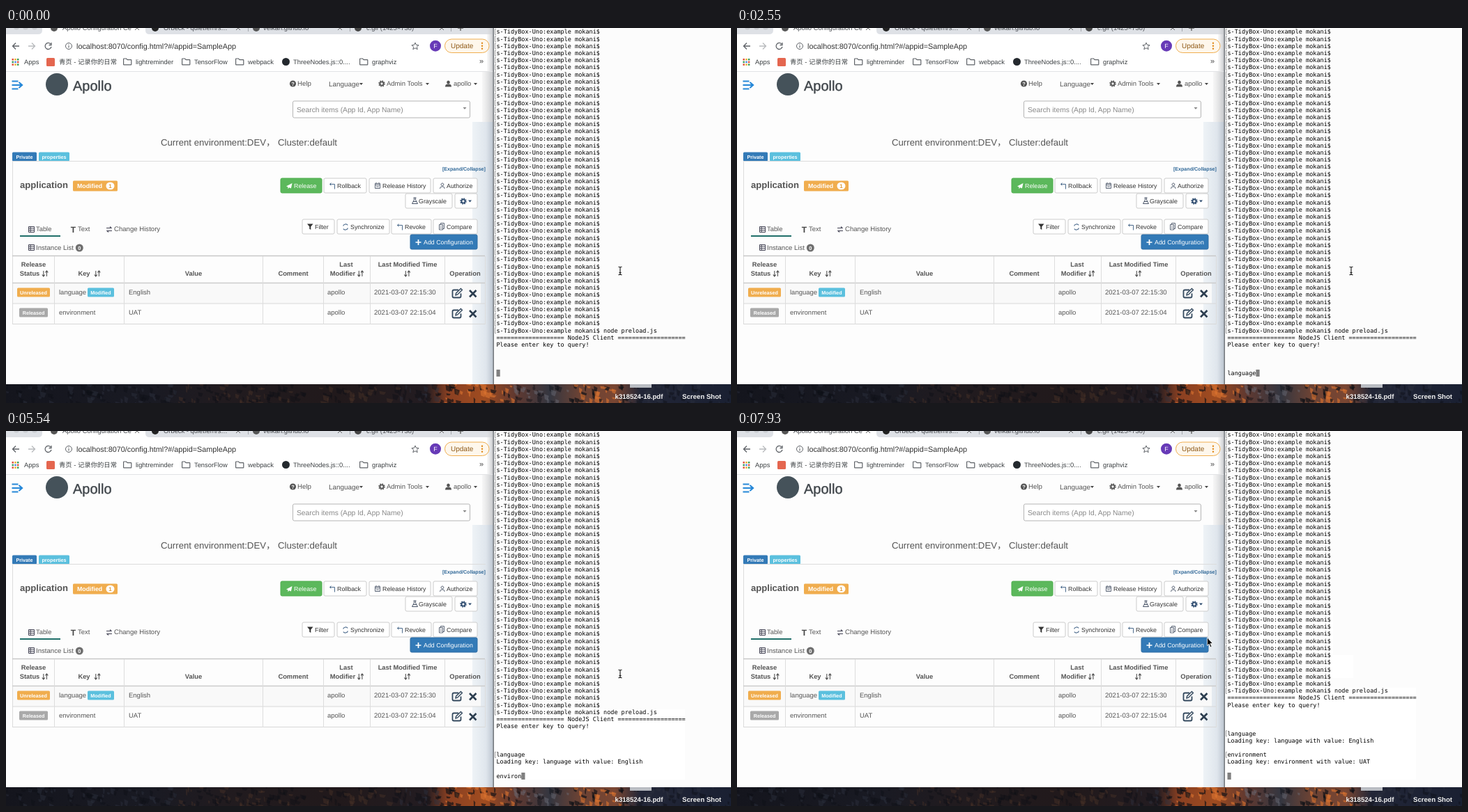
Write an HTML page that moves like this. It is 1040x539 px and loops after 8 s.

```html
<!DOCTYPE html>
<html lang="en">
<head>
<meta charset="utf-8">
<title>Configuration client demo</title>
<style>
  html, body { margin: 0; width: 100%; height: 100%; overflow: hidden; background: #fdfdfd; }
  svg { display: block; width: 1040px; height: 539px; }
  text { font-family: "Liberation Sans", "Noto Sans CJK SC", "Noto Sans CJK", sans-serif; white-space: pre; text-rendering: geometricPrecision; }
  text.mono { font-family: "DejaVu Sans Mono", monospace; font-size: 8.5px; }
</style>
</head>
<body>
<svg id="stage" viewBox="0 0 1040 539" xmlns="http://www.w3.org/2000/svg">
  <defs>
    <linearGradient id="wall">
      <stop offset="0" stop-color="#14151d"/><stop offset=".2" stop-color="#191a23"/>
      <stop offset=".3" stop-color="#211b1f"/><stop offset=".46" stop-color="#21191b"/>
      <stop offset=".58" stop-color="#231c21"/><stop offset=".61" stop-color="#8a4022"/>
      <stop offset=".66" stop-color="#a04c20"/><stop offset=".7" stop-color="#63392f"/>
      <stop offset=".75" stop-color="#343640"/><stop offset=".79" stop-color="#6a4234"/>
      <stop offset=".84" stop-color="#7a4632"/><stop offset=".875" stop-color="#222637"/>
      <stop offset="1" stop-color="#1a2032"/>
    </linearGradient>
    <linearGradient id="shade">
      <stop offset="0" stop-color="#dfe8ef" stop-opacity=".5"/>
      <stop offset=".65" stop-color="#d5dee7" stop-opacity=".75"/>
      <stop offset="1" stop-color="#b9c2cd"/>
    </linearGradient>
    <linearGradient id="shadeTop">
      <stop offset="0" stop-color="#ddd" stop-opacity=".2"/><stop offset="1" stop-color="#c4c6ca"/>
    </linearGradient>
    <clipPath id="wallClip"><rect y="512" width="1040" height="27"/></clipPath>
  </defs>
</svg>
<script>
const stage = document.getElementById('stage');
const LOOP = 8000;

function add(tag, attrs, parent = stage) {
  const el = document.createElementNS('http://www.w3.org/2000/svg', tag);
  for (const k in attrs) el.setAttribute(k, attrs[k]);
  return parent.appendChild(el);
}
const rect = (x, y, width, height, fill, more) => add('rect', { x, y, width, height, fill, ...more });
const disc = (cx, cy, r, fill, more) => add('circle', { cx, cy, r, fill, ...more });
const line = (d, stroke, width = 1, more) =>
  add('path', { d, stroke, fill: 'none', 'stroke-width': width, ...more });
const shape = (d, fill) => add('path', { d, fill });

// Places text by its vertical middle.
function label(s, x, cy, size, fill = '#333', more) {
  const el = add('text', { x, y: cy + size * 0.36, 'font-size': size, fill, ...more });
  el.textContent = s;
  return el;
}
const BOLD = { 'font-weight': 700 };
const MID = { 'text-anchor': 'middle' };
const BOLD_MID = { ...BOLD, ...MID };
const caret = (x, y, fill = '#444') => shape(`M${x} ${y}h5l-2.5 3z`, fill);

function tag(s, x, y, w, fill) {
  rect(x, y - .5, w, 13, fill, { rx: 1.5 });
  label(s, x + w / 2, y + 6, 7.2, '#fff', BOLD_MID);
}

function button(s, x, y, w, textX, fill = '#fff', border = '#ccc', color = '#333') {
  rect(x, y, w, 21, fill, { rx: 2, stroke: border });
  label(s, textX, y + 10.5, 8.85, color);
}

function wallpaper() {
  rect(0, 512, 1040, 27, 'url(#wall)');
  const g = add('g', { 'clip-path': 'url(#wallClip)' });
  let seed = 11;
  const rnd = () => (seed = (seed * 16807) % 2147483647) / 2147483647;
  for (let i = 0; i < 420; i++) {
    const x = rnd() * 1040, y = 509 + rnd() * 29, w = 2 + rnd() * 8, h = 2 + rnd() * 6;
    const warm = (x > 615 && x < 725) || (x > 805 && x < 890);
    const lit = warm ? '#d9722f' : x > 725 && x < 805 ? '#6d6f7a' : x > 240 && x < 560 ? '#4a3429' : '#2c303e';
    add('path', {
      d: `M${x} ${y}l${w} ${h * .4}l${-w * .3} ${h}l${-w * .6} ${-h * .3}z`,
      fill: rnd() < .55 ? '#0d0f16' : lit, opacity: warm ? .65 : .45,
    }, g);
  }
  rect(895, 512, 31, 5, '#b9bcc2');
  label('k318524-16.pdf', 908, 530, 9.6, '#f2f2f2', BOLD_MID);
  label('Screen Shot', 998, 530, 9.6, '#f2f2f2', BOLD_MID);
}

function browserBar() {
  rect(0, 0, 699, 9, '#dee1e6');
  shape('M46 9q6 0 6-6V0H200V3q0 6 6 6z', '#fff');
  rect(0, 9, 699, 53, '#fff');
  line('M0 62.5H699', '#e2e3e5');
  rect(690, 0, 9, 62, 'url(#shadeTop)');
  [15, 28, 41].forEach(x => disc(x, -1.5, 4, '#c9ccd1'));
  const tabs = [
    ['Apollo Configuration Ce', 81, 69, '#555'],
    ['Orbeck - quietfern/s…', 226, 214, '#222'],
    ['velkan.github.io', 369, 359, '#555'],
    ['c.gif (1425×738)', 517, 505, '#444'],
  ];
  tabs.forEach(([s, x, iconX, color], i) => {
    disc(iconX, 0, 5, color);
    label(s, x, 0, 9.4, '#4a4d52');
    const cx = [188, 333, 479, 625][i];
    line(`M${cx - 3} -3l6 6m0 -6l-6 6`, '#666');
  });
  line('M347.5 0V5M493.5 0V5M638.5 0V5', '#a5a8ad');
  line('M648 0h8M652 0v4', '#555', 1.3);

  line('M19 26H9.5M14 21.5L9.5 26L14 30.5', '#5f6368', 1.3);
  line('M32 26H41.5M37 21.5L41.5 26L37 30.5', '#b8babd', 1.3);
  line('M64 23A4.5 4.5 0 1 0 65 27M65 21V24.5H61.5', '#5f6368', 1.3);
  disc(90, 26, 4.5, 'none', { stroke: '#5f6368' });
  line('M90 25.3V28.6M90 23.2V24.3', '#5f6368', 1.1);
  label('localhost:8070/config.html?#/appid=SampleApp', 101, 26, 10.83, '#333');
  line('M587 21l1.5 3.4 3.6.3-2.8 2.4.9 3.6-3.2-1.9-3.2 1.9.9-3.6-2.8-2.4 3.6-.3z', '#5f6368', 1);
  disc(616, 25.7, 8, '#673ab7');
  label('F', 616, 25.7, 9, '#fff', MID);
  rect(629.5, 16, 63.5, 19.5, '#fef7ec', { rx: 9.7, stroke: '#f0ae50' });
  label('Update', 638, 25.7, 10, '#8f5a17');
  [21.7, 25.7, 29.7].forEach(y => disc(683, y, 1.2, '#e08a1c'));

  for (let i = 0; i < 9; i++)
    rect(8.5 + i % 3 * 3.7, 44 + (i / 3 | 0) * 3.7, 2.5, 2.5, ['#e0503f', '#4a85e8', '#3f9d58', '#e9b22c'][(i * 3 + (i / 3 | 0)) % 4]);
  rect(58, 43, 12, 12, '#e4664f', { rx: 1.5 });
  const marks = { 26: 'Apps', 76: '青页 - 记录你的日常', 186: 'lightreminder', 270: 'TensorFlow',
    347: 'webpack', 412: 'ThreeNodes.js::0....', 525: 'graphviz' };
  for (const x in marks) label(marks[x], +x, 48.5, 9.35, '#3c4043');
  [168, 252, 329, 507].forEach(x =>
    line(`M${x + .6} 44.6q0-.6.6-.6h3.4l1.6 1.6h5q.6 0 .6.6v6q0 .6-.6.6h-10q-.6 0-.6-.6z`, '#5f6368', 1.2));
  disc(401.5, 48.5, 5.5, '#24292e');
  label('»', 679, 47.5, 11, '#444');
}

function pageHeader() {
  line('M8.5 76.5H17.500M8.5 82H22M8.5 87.5H17.5M18.5 78l4.500 4-4.500 4', '#2487d8', 2.2);
  disc(73, 81, 16, '#45525a');
  label('Apollo', 96, 82.5, 20, '#40464b', { stroke: '#40464b', 'stroke-width': .4 });
  disc(411.5, 80, 4.6, '#555');
  label('?', 411.5, 80, 7.5, '#fff', BOLD_MID);
  label('Help', 418, 80, 9.7, '#555');
  label('Language', 463, 80, 9.9, '#555');
  caret(507, 79);
  gear(539, 80, '#555');
  label('Admin Tools', 546, 80, 9.5, '#555');
  caret(602, 79);
  shape('M634.5 75.5a2.3 2.5 0 1 1 0 5a2.3 2.5 0 1 1 0-5zM630 84.5q0-3.6 3-3.8h3q3 .2 3 3.8z', '#555');
  label('apollo', 642, 80, 9.5, '#555');
  caret(671, 79);
  rect(411.5, 105, 254, 24, '#fff', { rx: 2, stroke: '#b5b5b5' });
  label('Search items (App Id, App Name)', 417, 117.5, 10.25, '#888');
  caret(655.5, 114, '#888');
  label('Current environment:DEV，', 222, 164, 13.2, '#555');
  label('Cluster:default', 390, 164, 13.2, '#555');
}

function gear(x, y, color) {
  disc(x, y, 2.6, 'none', { stroke: color, 'stroke-width': 1.9 });
  disc(x, y, 4, 'none', { stroke: color, 'stroke-width': 1.5, 'stroke-dasharray': '1.6 1.54' });
}

function sortIcon(x, y) {
  line(`M${x - 2.2} ${y - 4}v8M${x - 4.2} ${y + 1.5}l2 2.5 2-2.5M${x + 2.4} ${y + 4}v-8M${x + .4} ${y - 1.5}l2-2.5 2 2.5`, '#555', 1.1);
}

function panel() {
  tag('Private', 9, 179, 35, '#337ab7');
  tag('properties', 47, 179, 44, '#5bc0de');
  line('M9.5 426V191.5H688', '#dcdcdc');
  label('[Expand/Collapse]', 626, 202, 7.1, '#2f6797', BOLD);
  label('application', 20, 225, 13.1, '#555', BOLD);
  rect(96, 219.5, 64, 15, '#f0ad4e', { rx: 1.5 });
  label('Modified', 102, 227, 8.8, '#fff', BOLD);
  rect(143.5, 221.8, 12, 10.4, '#fff', { rx: 5.2 });
  label('1', 149.5, 227, 8, '#e19b34', BOLD_MID);

  button('Release', 394, 216, 59, 413, '#5cb85c', '#4cae4c', '#fff');
  shape('M402 227.5l8.5-4.5-1.6 7.6-2.7-1.4-1.6 2-.2-2.8z', '#fff');
  button('Rollback', 456, 216, 61, 475);
  button('Release History', 521, 216, 88, 540);
  button('Authorize', 613, 216, 63, 632);
  button('Grayscale', 573, 238, 67, 592);
  button('', 644, 238, 32, 0);
  button('Filter', 425, 275, 46, 443);
  button('Synchronize', 475, 275, 75, 494);
  button('Revoke', 553, 275, 57, 572);
  button('Compare', 613, 275, 63, 632);
  button('Add Configuration', 580, 297, 96, 599, '#337ab7', '#2e6da4', '#fff');
  const undo = (x, y) => line(`M${x + 2.5} ${y - 4.5}l-2 2 2 2M${x + .5} ${y - 2.5}h7v7`, '#4b6a8c', 1);
  undo(464, 227);
  undo(561, 286);
  line('M529.5 223.5h7v7h-7zM529.5 225.5h7M531 222v2M535 222v2M531 228h4', '#4a5568', .9);
  line('M622.5 231q0-3 3-3h1.5q2 0 2 3M626 223a1.9 2 0 1 1-.1 0', '#4a5568', .9);
  line('M584.5 244h4M585.5 244v3l-3 5.5h8l-3-5.5v-3M584 249.5h5', '#4a5568', 1);
  gear(656, 249, '#2c4a6e');
  caret(663, 247.5, '#2c4a6e');
  shape('M432 281.5h8.5l-3.2 4v4.5l-2-1.2v-3.3z', '#333');
  line('M483.6 284.5a3.8 3.8 0 0 1 6.6-1.2M490.4 287.5a3.8 3.8 0 0 1-6.6 1.2', '#4b6a8c', 1.1);
  line('M621.5 282.5h5v7.5h-5zM623.5 282v-1.5h5v8h-2M623 285h2M623 287.5h2', '#4a5568', .9);
  line('M587.5 308h8M591.5 304v8', '#fff', 1.7);

  const grid = y => line(`M32.5 ${y - 4}h8v8h-8zM32.5 ${y - 1.5}h8M32.5 ${y + 1.3}h8M35.2 ${y - 4}v8`, '#445', 1);
  grid(289.5);
  label('Table', 43, 289, 9.4, '#555');
  rect(20, 298, 58, 2, '#1f6f69');
  label('T', 96.5, 289.5, 12, '#444', { ...BOLD_MID, 'font-family': 'Liberation Serif, serif' });
  label('Text', 103, 289, 9.5, '#555');
  line('M144 287.5h7l-2-2M152 291.5h-7l2 2', '#445', 1.1);
  label('Change History', 155, 289, 9.6, '#555');
  grid(315.5);
  label('Instance List', 43, 315.5, 9.6, '#555');
  disc(105.3, 316, 5.5, '#6f6f6f');
  label('0', 105.3, 316, 7.5, '#fff', BOLD_MID);
}

function configTable() {
  rect(10, 367, 671, 29, '#f9f9f9');
  line('M9 327.5H687', '#c8c8c8', 1.5);
  line('M9 366.5H687', '#ccc', 1.5);
  line('M9 396H687M9 425.5H687', '#d8d8d8');
  [69, 169, 368, 455, 522, 629, 687].forEach(x => line(`M${x + .5} 328V426`, '#ddd'));
  const head = (s, x, y) => label(s, x, y, 9.4, '#555', BOLD_MID);
  head('Release', 39.5, 340);
  head('Status', 34, 353);
  sortIcon(56, 353);
  head('Key', 112, 353);
  sortIcon(131, 353);
  head('Value', 269, 353);
  head('Comment', 412, 353);
  head('Last', 488, 340);
  head('Modifier', 483, 353);
  sortIcon(508.5, 353);
  head('Last Modified Time', 576, 340);
  sortIcon(575.5, 353);
  head('Operation', 658.5, 353);
  [['language', 'English', '30', 380], ['environment', 'UAT', '04', 409]].forEach(([key, value, sec, y]) => {
    label(key, 76, y, 9.5, '#555');
    label(value, 176, y, 9.5, '#555');
    label('apollo', 461, y, 9.5, '#555');
    label('2021-03-07 22:15:' + sec, 528, y, 9.55, '#555');
    line(`M649 ${y - 3.5}h-6.5q-2 0-2 2v7q0 2 2 2h8q2 0 2-2v-4`, '#34495e', 1.8);
    line(`M645 ${y + 4}l.6-2.8 6.8-6.8 2 2-6.8 6.8z`, '#34495e', 1.4);
    line(`M665 ${y - 3}l9.5 9.5m0-9.5l-9.5 9.5`, '#2c3e50', 2.6);
  });
  tag('Unreleased', 16, 374, 47, '#f0ad4e');
  tag('Modified', 117, 374, 38, '#5bc0de');
  tag('Released', 19, 403, 41, '#a9a9a9');
}

wallpaper();
rect(0, 0, 699, 512, '#fdfdfd');
rect(683, 62, 16, 73, 'url(#shadeTop)');
rect(669, 135, 30, 377, 'url(#shade)');
browserBar();
pageHeader();
panel();
configTable();
rect(698.5, 0, 1.5, 512, '#74787d');
rect(700, 0, 340, 512, '#fcfcfc');

// Terminal
const ROWS = 49, ROW_H = 10.22, CHAR_W = 8.5 * 0.602, LEFT = 703.5;
const PROMPT = 's-TidyBox-Uno:example mokani$ ';
const RULE = '='.repeat(19);
const INTRO = ['[' + PROMPT + 'node preload.js', `${RULE} NodeJS Client ${RULE}`, 'Please enter key to query!', '', '', ''];
const QUERIES = [
  { key: 'language', value: 'English', enter: 2840, strokes: [900, 1050, 1200, 1800, 1950, 2100, 2400, 2550] },
  { key: 'environment', value: 'UAT', enter: 6290,
    strokes: [4790, 4790, 4940, 5090, 5390, 5390, 5540, 5690, 5840, 5990, 6140] },
];
const PATCHES = [
  [2840, 701, 400, 273, 101], [6290, 701, 369, 273, 132],
  [7640, 849, 322, 35, 33], [7780, 811, 259, 44, 76], [7930, 701, 259, 115, 53],
].map(([start, ...box]) => ({ start, el: rect(...box, '#fff') }));

const rows = Array.from({ length: ROWS }, (_, i) => {
  const y = 8.3 + i * ROW_H;
  const mark = line(`M703 ${y - 6.8}h-1.5v8h1.5`, '#999', .9);
  const text = add('text', { class: 'mono', x: LEFT, y, fill: '#000' });
  return { mark, text };
});
const block = rect(LEFT, 491, 5.2, 10, '#808080');

const beam = add('g', {});
const BEAM = 'M-2.5 -5.8Q0 -5.8 0 -4.3V4.3Q0 5.8 -2.5 5.8M2.5 -5.8Q0 -5.8 0 -4.3V4.3Q0 5.8 2.5 5.8M-1.5 2.5H1.5';
add('path', { d: BEAM, fill: 'none', stroke: '#fff', 'stroke-width': 2.2 }, beam);
add('path', { d: BEAM, fill: 'none', stroke: '#111', 'stroke-width': 1.1 }, beam);
const arrow = add('path', { d: 'M674.5 297v11.5l2.6-2.4 1.9 4.6 1.9-.8-1.9-4.4h3.5z', fill: '#000', stroke: '#fff', 'stroke-width': .8 });

function terminalLines(t) {
  const lines = [...INTRO];
  for (const q of QUERIES) {
    if (t < q.enter) {
      lines.push(q.key.slice(0, q.strokes.filter(s => s <= t).length));
      return lines;
    }
    lines.push('[' + q.key, `Loading key: ${q.key} with value: ${q.value}`, '');
  }
  lines.push('');
  return lines;
}

function render(t) {
  const lines = terminalLines(t);
  rows.forEach(({ mark, text }, i) => {
    const s = lines[i - (ROWS - lines.length)] ?? '[' + PROMPT;
    const marked = s[0] === '[';
    const shown = marked ? s.slice(1) : s;
    if (text.textContent !== shown) text.textContent = shown;
    mark.setAttribute('opacity', marked ? 1 : 0);
  });
  block.setAttribute('x', LEFT + lines[lines.length - 1].length * CHAR_W);
  PATCHES.forEach(p => p.el.setAttribute('opacity', t >= p.start ? 1 : 0));
  const [x, y] = t < 7640 ? [881, 349] : t < 7780 ? [852, 328] : [814, 265];
  beam.setAttribute('transform', `translate(${x} ${y})`);
  beam.setAttribute('opacity', t < 7930 ? 1 : 0);
  arrow.setAttribute('opacity', t < 7930 ? 0 : 1);
}

const start = performance.now();
function tick() {
  render((performance.now() - start) % LOOP);
  requestAnimationFrame(tick);
}
tick();
</script>
</body>
</html>
```
